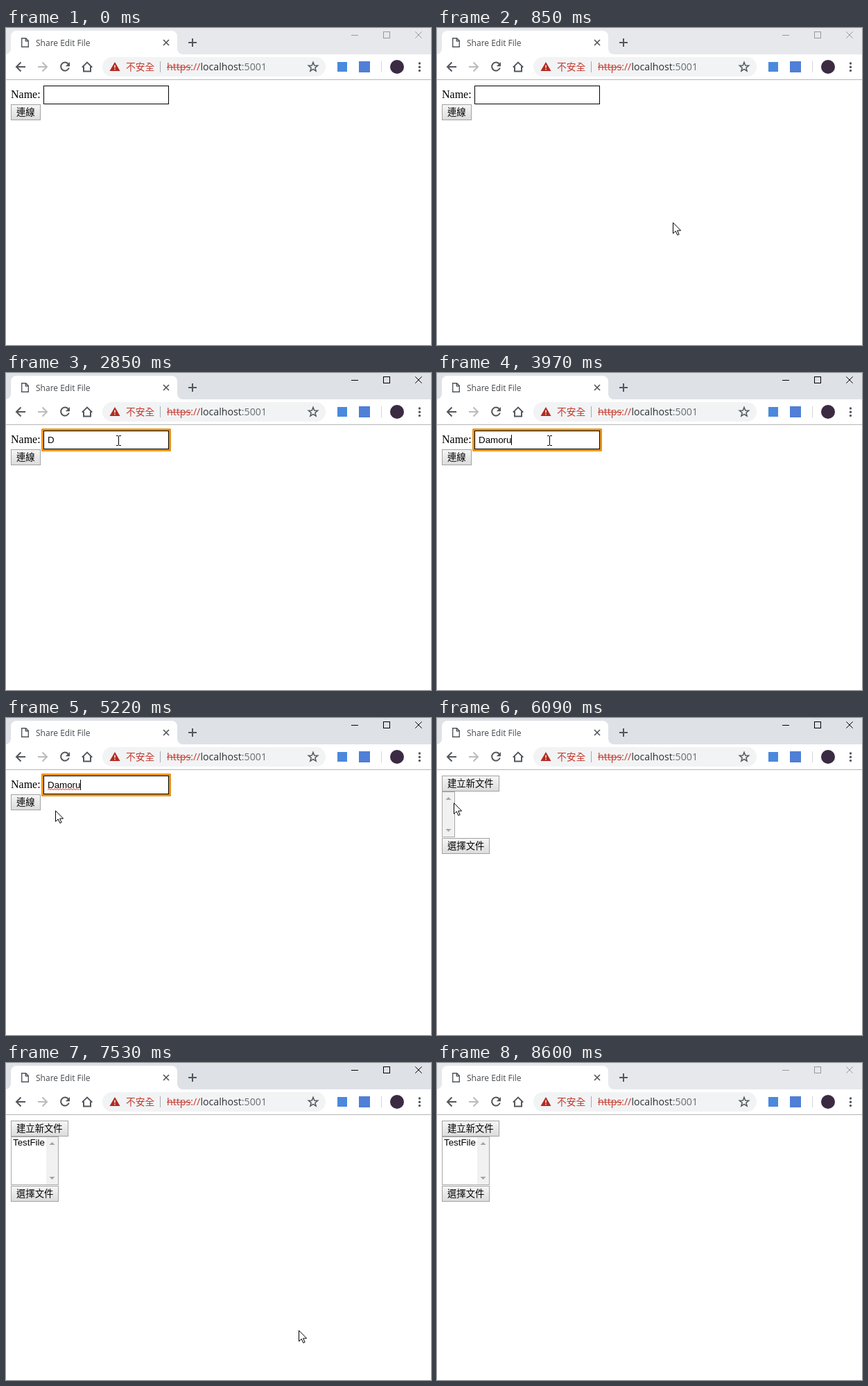
Animation, 613 px wide and 457 px high, one loop 8.7 s. Source, as an HTML page:

```html
<!DOCTYPE html>
<html lang="zh-Hant">
<head>
<meta charset="utf-8">
<title>Share Edit File</title>
<style>
  html, body { margin: 0; width: 100%; height: 100%; overflow: hidden; background: #fff; }
  svg { display: block; }
  .ui { font-family: "Open Sans", "Noto Sans", sans-serif; }
  .cjk { font-family: "Noto Sans CJK TC", "Noto Sans CJK JP", "Noto Sans CJK", sans-serif; }
  .sans { font: 13.333px "Liberation Sans", Arial, sans-serif; }
  .serif { font: 16px "Liberation Serif", "Times New Roman", serif; }
  .line { fill: none; stroke: #53575b; stroke-width: 2; }
  .btn rect { fill: url(#face); stroke: #a2a2a2; }
  .btn.hover rect { fill: url(#faceHover); stroke: #8a8a8a; }
  .btn.down rect { fill: url(#faceDown); stroke: #8a8a8a; }
  .btn text { font-size: 13.333px; }
  .crisp { shape-rendering: crispEdges; }
</style>
</head>
<body>
<svg width="613" height="457" viewBox="0 0 613 457">
  <defs>
    <linearGradient id="face" x2="0" y2="1"><stop stop-color="#f6f6f6"/><stop offset="1" stop-color="#dcdcdc"/></linearGradient>
    <linearGradient id="faceHover" x2="0" y2="1"><stop stop-color="#fafafa"/><stop offset="1" stop-color="#e2e2e2"/></linearGradient>
    <linearGradient id="faceDown" x2="0" y2="1"><stop stop-color="#dcdcdc"/><stop offset="1" stop-color="#f6f6f6"/></linearGradient>
  </defs>

  <!-- tab strip -->
  <rect id="strip" width="613" height="38"/>
  <path fill="#fff" d="M-1 38a8 8 0 0 0 8-8V12a8 8 0 0 1 8-8H239a8 8 0 0 1 8 8V30a8 8 0 0 0 8 8Z"/>
  <path class="line" style="stroke-width:1.4" d="M22.7 14.7H28.6L32.3 18.4V27.3H22.7ZM28.3 14.7V18.7H32.3"/>
  <text class="ui" x="43" y="26" font-size="12" fill="#45494d">Share Edit File</text>
  <path class="line" style="stroke-width:1.7" d="M227 17l8 8M235 17l-8 8"/>
  <path class="line" d="M263 21h12M269 15v12"/>
  <g id="controls" fill="none">
    <path class="crisp" d="M498 10.5h10M544.5 5.5h9v9h-9Z"/>
    <path d="M590.3 5.3l9.4 9.4M599.7 5.3l-9.4 9.4"/>
  </g>

  <!-- toolbar -->
  <rect y="38" width="613" height="36" fill="#fff"/>
  <rect y="74" width="613" height="1" fill="#b6b6b6"/>
  <path class="line" d="M28 56H15.5M21.5 49.5L15 56l6.5 6.5"/>
  <path class="line" style="stroke:#b9bbbe" d="M46 56h12.5M52.5 49.5L59 56l-6.5 6.5"/>
  <path class="line" d="M89.6 51.6A6 6 0 1 0 90.8 57.5"/>
  <path fill="#53575b" d="M92 49v6.2h-6.2Z"/>
  <path class="line" d="M109.8 56.6L117 49.6l7.2 7M112 55.5V62.5h10V55.5"/>
  <rect x="139" y="42" width="322" height="28" rx="14" fill="#f1f3f4"/>
  <path fill="#b3291f" d="M157 49l7.5 13h-15Z"/>
  <path stroke="#f1f3f4" stroke-width="1.5" d="M157 53.5v4M157 58.7v1.5"/>
  <text class="cjk" x="173" y="61" font-size="13.8" fill="#c5392d">不安全</text>
  <path class="crisp" stroke="#a8abae" d="M222.5 48v16"/>
  <g class="ui" font-size="14.18">
    <text x="232" y="61" fill="#c5392d">https://</text>
    <text x="280.4" y="61" fill="#2d3034">localhost</text>
    <text x="339.8" y="61" fill="#696d71">:5001</text>
  </g>
  <path class="crisp" stroke="#c5392d" d="M232 56.5h35"/>
  <path id="star" class="line" style="stroke-width:1.5"/>
  <rect x="478" y="49" width="14" height="14" fill="#4b89dc"/>
  <rect x="509" y="48" width="16" height="16" fill="#4f7fd6"/>
  <path class="crisp" stroke="#d3d5d8" d="M541.5 48v16"/>
  <circle cx="564" cy="56" r="10" fill="#3a2a42"/>
  <g fill="#53575b"><circle cx="596.5" cy="51" r="1.7"/><circle cx="596.5" cy="56.2" r="1.7"/><circle cx="596.5" cy="61.4" r="1.7"/></g>

  <!-- login page -->
  <g id="login">
    <text class="serif" x="7" y="101">Name:</text>
    <rect id="ring" x="51" y="80" width="187" height="33" rx="1.5" fill="#e8941a"/>
    <rect class="crisp" x="54.5" y="83.5" width="180" height="26" fill="#fff" stroke="#000"/>
    <text id="typed" class="sans" x="60" y="101"></text>
    <path id="squiggle" fill="none" stroke="#e5322d"/>
    <rect id="caret" y="89" width="1" height="15"/>
    <g id="connect" class="btn"><rect x="7.5" y="110.5" width="42" height="22"/><text class="cjk" x="15" y="126">連線</text></g>
  </g>

  <!-- file page -->
  <g id="files">
    <g class="btn"><rect x="7.5" y="83.5" width="82" height="22"/><text class="cjk" x="15" y="99">建立新文件</text></g>
    <rect id="list" class="crisp" x="7.5" y="106.5" fill="#fff" stroke="#a9a9a9"/>
    <rect id="track" y="107" width="17" fill="#f1f1f1"/>
    <path id="arrows" fill="#a3a3a3"/>
    <text id="item" class="sans" x="10" y="119">TestFile</text>
    <g id="choose" class="btn"><rect x="7.5" y="173.5" width="68" height="22"/><text class="cjk" x="15" y="189">選擇文件</text></g>
  </g>

  <g id="pointer">
    <path id="arrow" fill="#fff" stroke="#000" d="M.5 .7V16.2L4.2 12.8 6.8 18.5 9.1 17.5 6.6 12H11.6Z"/>
    <path id="beam" class="crisp" fill="none" stroke="#000" d="M-3 -6.5h3M1 -6.5h3M.5 -6V7M-3 7.5h3M1 7.5h3"/>
    <circle id="glow" cx="-2" cy="-.5" r="12" fill="#ff0" opacity=".5"/>
  </g>
</svg>

<script>
const LOOP = 8700;
const NAME = "Damoru";
const KEYS = [2340, 2900, 3310, 3590, 3770, 3970];
const CARET_X = [60, 69, 77, 88, 95, 100, 107];
const CARET_ON = [[1540, 2060], [2340, 2850], [2900, 4510], [5000, 5530]];
const CLICKS = [[1540, 1690], [5960, 6090]];

// first step, last step, step count, end x, end y, eased
const LEGS = [
  [490, 1230, 17, 162, 97, true],
  [4840, 5220, 8, 71, 133],
  [5250, 5300, 2, 24, 122],
  [6790, 6790, 1, 23, 122],
  [7130, 7210, 3, 165, 221],
  [7270, 7590, 8, 508, 440]
];

const $ = id => document.getElementById(id);
const within = (t, [a, b]) => t >= a && t < b;
const show = (id, on) => $(id).setAttribute("visibility", on ? "inherit" : "hidden");
const set = (id, attrs) => {
  for (const key in attrs) $(id).setAttribute(key, attrs[key]);
};

function pointerAt(t) {
  let x = 489, y = 433;
  for (const [from, to, n, endX, endY, eased] of LEGS) {
    if (t < from) break;
    const step = (to - from) / (n - 1) || 1;
    const k = Math.min(n, Math.floor((t - from) / step + 1e-6) + 1);
    let u = k / n;
    if (eased) u = u * u * (3 - 2 * u);
    x += (endX - x) * u;
    y += (endY - y) * u;
  }
  return [Math.round(x), Math.round(y)];
}

function drawStatics() {
  let star = "";
  for (let i = 0; i < 10; i++) {
    const a = i * Math.PI / 5, r = i % 2 ? 3 : 7;
    star += (i ? "L" : "M") + (443 + r * Math.sin(a)).toFixed(2) + " " + (56.4 - r * Math.cos(a)).toFixed(2);
  }
  set("star", { d: star + "Z" });

  let wave = "M60 103.5";
  for (let x = 62; x <= 106; x += 2) wave += `L${x} ${x % 4 ? 101.9 : 103.7}`;
  set("squiggle", { d: wave });
}

function drawList(filled) {
  const width = filled ? 68 : 18, height = filled ? 69 : 65;
  const mid = width - 1.5, low = filled ? 164 : 160;
  set("list", { width, height });
  set("track", { x: width - 10, height: height - 1 });
  set("arrows", { d: `M${mid - 4} 118l4-4 4 4ZM${mid - 4} ${low}h8l-4 4Z` });
  set("choose", { transform: `translate(0 ${filled ? 4 : 0})` });
  show("item", filled);
}

function render(t) {
  const active = within(t, [1540, 8600]);
  set("strip", { fill: active ? "#dee1e6" : "#e7e8ec" });
  set("controls", { stroke: active ? "#000" : "#999" });

  const login = t < 6090;
  show("login", login);
  show("files", !login);
  drawList(t >= 6140);

  const count = KEYS.filter(k => t >= k).length;
  $("typed").textContent = NAME.slice(0, count);
  set("caret", { x: CARET_X[count] });
  show("caret", CARET_ON.some(span => within(t, span)));
  show("ring", within(t, [1540, 5960]));
  show("squiggle", within(t, [5000, 6090]));

  const [x, y] = pointerAt(t);
  const overInput = login && x > 54 && x < 235 && y > 83 && y < 110;
  const overButton = login && x > 7 && x < 50 && y > 110 && y < 133;
  const pressed = CLICKS.some(span => within(t, span));
  $("connect").setAttribute("class", "btn" + (overButton ? pressed ? " down" : " hover" : ""));

  set("pointer", { transform: `translate(${x} ${y})` });
  show("pointer", within(t, [490, 7630]));
  show("arrow", !overInput);
  show("beam", overInput);
  show("glow", pressed);
}

const start = performance.now();
function tick() {
  render((performance.now() - start) % LOOP);
  requestAnimationFrame(tick);
}
drawStatics();
tick();
</script>
</body>
</html>
```
